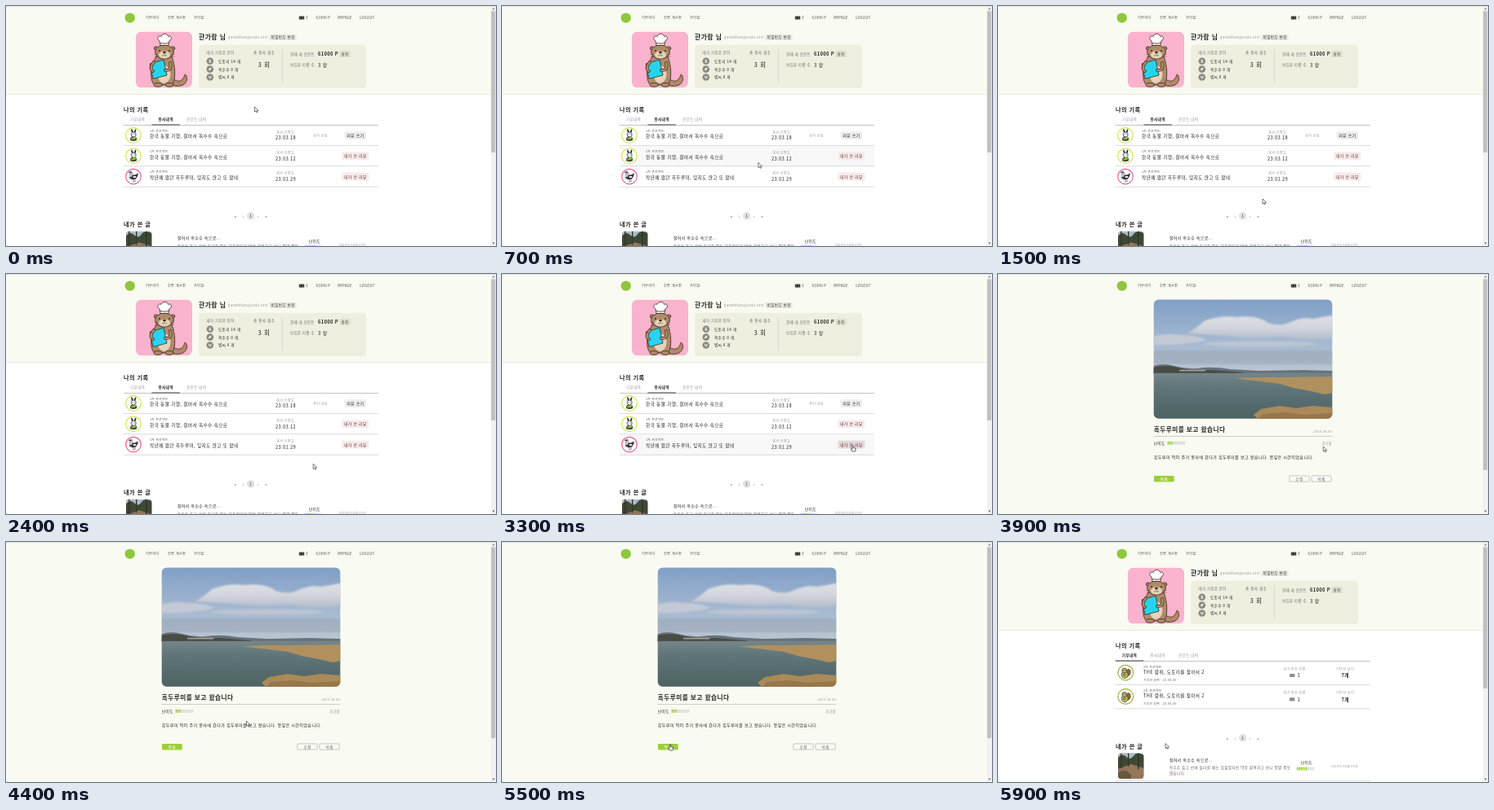
An HTML page that plays this animation: 600 by 295 pixels, repeating every 6 s.

```html
<!DOCTYPE html>
<html lang="ko">
<head>
<meta charset="utf-8">
<title>나의 기록</title>
<style>
  html, body { margin: 0; width: 100%; height: 100%; overflow: hidden; background: #fff; }
  svg { display: block; width: 600px; height: 295px; }
  text { font-family: "Noto Sans CJK KR", "Noto Sans CJK", "Noto Sans", sans-serif; letter-spacing: .065em; white-space: pre; }
</style>
</head>
<body>
<svg id="stage" viewBox="0 0 600 295" xmlns="http://www.w3.org/2000/svg">
  <defs>
    <linearGradient id="sky" x1="0" y1="0" x2="0" y2="1">
      <stop offset="0" stop-color="#7f9fc6"/><stop offset=".55" stop-color="#a3b8d1"/><stop offset="1" stop-color="#bcc6d1"/>
    </linearGradient>
    <linearGradient id="cloud" x1="0" y1="0" x2="0" y2="1">
      <stop offset="0" stop-color="#dfe0e6"/><stop offset=".5" stop-color="#d3d5dd"/><stop offset="1" stop-color="#b3bccb"/>
    </linearGradient>
    <linearGradient id="water" x1="0" y1="0" x2="0" y2="1">
      <stop offset="0" stop-color="#74868a"/><stop offset=".3" stop-color="#607578"/><stop offset="1" stop-color="#4d6262"/>
    </linearGradient>
    <filter id="soft" x="-20%" y="-50%" width="140%" height="200%"><feGaussianBlur stdDeviation="1.3"/></filter>
    <clipPath id="photoClip"><rect x="190.7" y="31.5" width="218.6" height="146.3" rx="6"/></clipPath>
    <clipPath id="thumbClip"><rect x="147" y="259.7" width="31.3" height="31.3" rx="4"/></clipPath>
    <clipPath id="avatarClip"><rect x="159" y="31.5" width="69" height="69" rx="7"/></clipPath>
  </defs>
</svg>
<script>
const LOOP = 6000, STEP = 100, OPEN = 3400, BACK = 5700;
const INK = '#222', MID = '#666', PALE = '#999', GREEN = '#9ccf3b';
const USER = '한가람', MAIL = 'garamhan@sodu.test';
const stage = document.getElementById('stage');

const rect = (x, y, w, h, fill, r = 0, extra = '') =>
  `<rect x="${x}" y="${y}" width="${w}" height="${h}" rx="${r}" fill="${fill}" ${extra}/>`;
const disc = (x, y, r, fill, extra = '') => `<circle cx="${x}" cy="${y}" r="${r}" fill="${fill}" ${extra}/>`;
const oval = (x, y, rx, ry, fill, extra = '') =>
  `<ellipse cx="${x}" cy="${y}" rx="${rx}" ry="${ry}" fill="${fill}" ${extra}/>`;
const shape = (d, fill, extra = '') => `<path d="${d}" fill="${fill}" ${extra}/>`;
const rule = (x, y, w, color = '#c4c4c4', h = .6) => rect(x, y, w, h, color);
const text = (x, y, size, str, fill = INK, weight = 400, anchor = 'start') =>
  `<text x="${x}" y="${y}" font-size="${size * .93}" fill="${fill}" font-weight="${weight}" text-anchor="${anchor}">${str}</text>`;
const mid = (x, y, size, str, fill, weight) => text(x, y, size, str, fill, weight, 'middle');
const move = (x, y, body) => `<g transform="translate(${x} ${y})">${body}</g>`;

const ticket = (x, y, color) => rect(x, y, 6.4, 4.2, color, .6) +
  shape(`M${x + 1.6} ${y + .7}v2.8M${x + 4.8} ${y + .7}v2.8`, 'none', 'stroke="#fff" stroke-width=".4" stroke-dasharray=".6 .5"');

const level = (x, y, on) => Array.from({ length: 10 }, (_, i) =>
  rect(x + i * 2.2, y, 1.5, 4.2, i < on ? GREEN : '#d9d9d4', .4)).join('');

function nav() {
  const links = [[171, '기부하기'], [198, '인증 게시판'], [230, '가이샵'], [367.2, '3'], [379.8, '61000 P'], [406.2, 'MYPAGE'], [433.2, 'LOGOUT']];
  return disc(151.8, 14.6, 6.2, '#8fc73e') + ticket(358.8, 12.4, '#333') +
    links.map(([x, label]) => text(x, 16.1, 4.5, label, '#444')).join('');
}

const scrollbar = end => rect(594, 0, 6, 295, '#f1f1f1') + rect(594, 6.5, 5.2, end - 6.5, '#c1c1c1') +
  shape('M595.4 4.2h3l-1.5-1.9z', '#777') + shape('M595.4 290.8h3l-1.5 1.9z', '#555');

function avatar() {
  const line = 'stroke="#3c2a22" stroke-width=".8" stroke-linejoin="round" stroke-linecap="round"';
  const fur = '#b08a6a', cream = '#e6d3ba';
  const arms = 'M201 70C203 76 200 80 195 79M181 69C177 74 176 78 180 80';
  return '<g clip-path="url(#avatarClip)">' + rect(159, 31.5, 69, 69, '#f9b3cd') +
    shape('M203 88C210 95 217 93 219 84C223 86 223 96 214 98C208 99 203 98 199 95Z', fur, line) +
    shape('M184 62C177 73 175 92 182 97H203C209 90 207 72 203 62Z', fur, line) +
    oval(193.5, 84, 8, 11, cream) +
    oval(186, 97, 5, 2.4, fur, line) + oval(200, 97, 5, 2.4, fur, line) +
    disc(183.5, 52, 2.2, fur, line) + disc(204.5, 52, 2.2, fur, line) +
    oval(194, 56.5, 11.4, 8.6, fur, line) + oval(194, 60, 7, 4.6, cream) +
    disc(188, 55, .9, '#222') + disc(200, 55, .9, '#222') + oval(194, 57, 1.9, 1.2, '#3a2823') +
    shape('M194 58v2M191 60.6q1.5 1.4 3-.6q1.5 2 3 .6M186 60l-4-.6M186 61.6l-4 .8M202 60l4-.6M202 61.6l4 .8', 'none', 'stroke="#3c2a22" stroke-width=".5"') +
    shape('M189 48L188 43C184 41 186 35.5 190 37.3C191.5 33 198 33.5 198.5 37.3C203 36 204 41 199.8 43L199 48Z', '#fff', line) +
    shape('M189 45.6Q194 46.8 199.3 45.6', 'none', line) +
    shape('M176.5 71L193 66L197 85L180.5 89.5Z', '#25d5f0', line) +
    shape(arms, 'none', 'stroke="#3c2a22" stroke-width="3.8" stroke-linecap="round"') +
    shape(arms, 'none', `stroke="${fur}" stroke-width="2.5" stroke-linecap="round"`) + '</g>';
}

const foods = [
  ['도토리 14 개', 'M-1.8-.6Q0-3 1.8-.6ZM-1.5 0H1.5Q1 2 0 2.4Q-1 2-1.5 0Z'],
  ['옥수수 0 개', 'M-1.9 1.8Q-1.6-1.3 1.8-2Q1.9 1-1.9 1.8Z'],
  ['볍씨 0 개', 'M-1.8-1.8Q-.2-1.5-.2 2Q-1.9.4-1.8-1.8ZM1.8-1.8Q.2-1.5.2 2Q1.9.4 1.8-1.8Z']
];

function profile() {
  const food = ([label, icon], i) => {
    const y = 67.7 + i * 9.9;
    return disc(249.8, y, 4.3, '#8b8a80') + move(249.8, y, shape(icon, '#fff')) + text(260, y + 1.9, 5, label);
  };
  return rect(0, 0, 594, 108.5, '#f9faf1') + rule(0, 108.3, 594, '#dfe0d6') + avatar() +
    text(236, 40.6, 8.4, USER + ' 님', INK, 700) + text(272, 40.4, 4.7, MAIL, PALE) +
    rect(322.6, 34.8, 33, 7.3, '#e8e8de', 1.5) + mid(339.1, 40.3, 5, '비밀번호 변경', '#444') +
    rect(236, 47.7, 205, 53.3, '#eeefdf', 3.5) +
    text(245.6, 59.3, 4.8, '내가 기부한 모이', MID) + foods.map(food).join('') +
    mid(316, 59.4, 5, '총 봉사 횟수', MID) + mid(316, 75.4, 8.2, '3 회', INK, 500) +
    rect(337.9, 54, .6, 41, '#c6c7b9') +
    text(348, 60.5, 4.85, '현재 내 포인트', MID) + text(382, 60.9, 6.2, '61000 P', INK, 700) +
    rect(408, 54.8, 14, 7.7, '#dfe0d2', 1.5) + mid(415, 60.5, 5, '충전', '#444') +
    text(348, 74.4, 4.85, '보유한 티켓 수', MID) + text(382, 74.9, 6.5, '3 장', INK, 500);
}

function tabs(active) {
  const names = ['기부내역', '봉사내역', '포인트 내역'], centers = [161, 195.6, 233];
  return text(144, 129.8, 7.7, '나의 기록', INK, 700) + rule(144, 146, 312, '#aaa', .7) +
    names.map((n, i) => mid(centers[i], 141.2, 5, n, i === active ? INK : PALE, i === active ? 700 : 400)).join('') +
    rule(centers[active] - 17.2, 145.5, 34.4, '#444', 1);
}

function posts(dy) {
  const pager = [[281, '«'], [291, '‹'], [299.7, '1'], [309, '›'], [318.5, '»']];
  const thumb = '<g clip-path="url(#thumbClip)">' + rect(147, 259, 32, 33, '#56513f') +
    rect(147, 259, 32, 10, '#a9bccb') +
    shape('M147 265Q152 259 157 264T166 263T179 262V278H147Z', '#3d4934') +
    shape('M147 279L163 273L179 278V292H147Z', '#94765a') +
    shape('M150 259h1.5v19H150zM159 259h1.4v17H159zM171 259h1.6v20H171z', '#35352a') +
    shape('M147 284Q155 277 163 286V292H147Z', '#66593f') + '</g>';
  return move(0, dy, disc(299.7, 240.7, 4.7, '#e0e0e0') +
    pager.map(([x, p]) => mid(x, 242.6, 5.3, p, '#444')).join('') +
    text(144, 253.8, 7.75, '내가 쓴 글', INK, 700) + thumb +
    text(209.7, 269.5, 5.4, '걸어서 옥수수 속으로...', INK, 500) +
    text(209.7, 279.3, 5, '옥수수 들고 산에 올라갈 때는 힘들었지만 막상 참여하고 보니 정말 뿌듯', MID) +
    text(209.7, 286, 5, '했습니다.', MID) +
    mid(378, 273.4, 5.2, '난이도', INK, 500) + level(366, 276.5, 6) +
    text(441, 277.3, 4.2, '2023년 04월 05일', PALE, 400, 'end') + rule(144, 293.2, 312, '#ccc'));
}

const badge = (ring, body) => disc(0, 0, 9.3, '#fff', `stroke="${ring}" stroke-width="1.2"`) + body;
const rabbit = badge('#d8df57',
  oval(-1.5, -5, 1, 3, '#333', 'transform="rotate(-18 -1.5 -5)"') + oval(2, -5, 1, 3, '#333', 'transform="rotate(20 2 -5)"') +
  disc(.2, -1, 3, '#fff', 'stroke="#333" stroke-width=".8"') + disc(-.9, -1.2, .5, '#222') + disc(1.3, -1.2, .5, '#222') +
  shape('M-4 6Q-4 1 0 1.8Q5 1 4 6Q0 8-4 6Z', '#394238') + shape('M-3 5Q-1 1 4 2Q3 6-3 5Z', '#8abf3f'));
const crane = badge('#e85f98',
  shape('M-5 2Q-3-3 2-2L6-4Q5 4-1 4Z', '#333') + shape('M-4 1Q-5-3-3-6L-1.5-5Q-3-3-1 0Z', '#fff', 'stroke="#333" stroke-width=".7"') +
  shape('M-3-6L-6-5L-3-4.6ZM0 4V7.5M2 3V7', '#333', 'stroke="#333" stroke-width=".6"') + oval(1.5, .5, 2, 1.2, '#eee'));
const squirrel = badge('#cfd850',
  disc(0, 0, 9.3, 'none', 'stroke="#555" stroke-width=".8" stroke-dasharray="1.2 1.2"') +
  shape('M2 5Q8 3 6-3Q3-7 1-2Z', '#7b6a3c') + oval(-1, 2.5, 4, 4.3, '#c4b267', 'stroke="#333" stroke-width=".7"') +
  disc(-1.5, -2.5, 3, '#c4b267', 'stroke="#333" stroke-width=".7"') +
  disc(-2.6, -2.8, .5, '#222') + disc(-.3, -2.8, .5, '#222') + oval(-1.5, 2.6, 1.7, 2, '#6f9b3a'));

const ROW_TOP = 146.6, ROW_H = 25.3;
const visits = [
  ['한국 동물 기행, 걸어서 옥수수 속으로', '23.03.18', rabbit, false],
  ['한국 동물 기행, 걸어서 옥수수 속으로', '23.03.12', rabbit, true],
  ['작년에 왔던 흑두루미, 잊지도 않고 또 왔네', '23.01.29', crane, true]
];

function visitRow([title, date, art, done], i) {
  const y = ROW_TOP + i * ROW_H;
  const [bx, bw, fill, label] = done ? [411.3, 33, '#f4ebeb', '내가 쓴 리뷰'] : [414.5, 26.6, '#eee', '리뷰 쓰기'];
  return '<g class="row">' + rect(144, y, 312, ROW_H, '#f8f8f8', 0, 'class="hover" visibility="hidden"') +
    move(156, y + 12.4, art) +
    text(176, y + 8.2, 4.1, '1차 프로젝트', MID) + text(176, y + 15.7, 6.1, title, INK, 500) +
    mid(342, y + 10, 4.4, '봉사 신청일', PALE) + mid(342.5, y + 17.6, 6.1, date, INK, 500) +
    (done ? '' : mid(385, y + 14, 4.4, '봉사 완료', PALE)) +
    rect(bx, y + 7.6, bw, 9.8, fill, 2, 'class="btn"') +
    mid(427.8, y + 14.4, 5.3, label, done ? '#733' : INK, 500) +
    rule(144, y + ROW_H - .6, 312) + '</g>';
}

function giftRow(i) {
  const y = ROW_TOP + i * 29.3;
  return move(156.3, y + 14, squirrel) +
    text(178, y + 7.9, 4.1, '2차 프로젝트', MID) + text(178, y + 15.3, 6.05, 'THE 람쥐, 도토리를 찾아서 2', INK, 500) +
    text(178, y + 24.4, 4.1, '기부한 날짜 : 23.04.06', MID) +
    mid(363, y + 11, 4.4, '내가 받은 티켓', PALE) + ticket(357, y + 15.3, '#888') + text(366.6, y + 19.7, 6.2, '1', INK, 500) +
    mid(425, y + 11, 4.5, '기부한 모이', PALE) + mid(425.3, y + 19.7, 6.2, '7개', INK, 700) +
    rule(144, y + 28.7, 312);
}

const photo = () => '<g clip-path="url(#photoClip)">' + rect(190, 31, 220, 92, 'url(#sky)') +
  '<g filter="url(#soft)">' +
  shape('M232 73Q244 66 252 58Q272 50 292 53Q318 50 330 60Q345 65 356 60Q372 52 386 55L414 50V78Q380 84 350 77Q310 80 280 76Z', 'url(#cloud)') +
  shape('M186 78Q204 72 222 75Q240 74 256 81Q230 88 186 87Z', '#c3cad6') +
  oval(320, 86, 70, 3.5, '#bcc5d2') +
  rect(186, 94, 228, 17, '#8f9cab', 4, 'opacity=".4"') + '</g>' +
  shape('M190 113Q202 109 216 113T244 116Q262 113 284 117L320 119L372 118L410 119V123H190Z', '#66727c') +
  shape('M190 115Q205 111 220 115T262 118L300 121V123H190Z', '#474d45') +
  rect(190, 121.8, 220, 57, 'url(#water)') + rect(222, 117.8, 32, 1.6, '#a9a291') +
  shape('M290 128.5Q310 126 340 127L410 126V146L400 148Q380 143 362 140L345 135L322 132Z', '#b0905f') +
  shape('M318 178L313 173L322 166L345 162L365 165L385 162L410 164V178Z', '#a98a58') +
  shape('M318 178L325 172L350 170L375 173L410 171V178Z', '#96764a') + '</g>';

const LIST = [191, 248, 24.7, 7.4];
const outlineBtn = (x, label) => rect(x, 248, 24.3, 7.2, '#fbfbf6', 1.2, 'stroke="#b0b0ac" stroke-width=".7"') +
  mid(x + 12.15, 253.5, 5.2, label, MID);

const detail = () => rect(0, 0, 600, 295, '#f9faf1') + nav() + photo() +
  text(190.7, 193.6, 8.2, '흑두루미를 보고 왔습니다', INK, 700) +
  text(409, 195.2, 4.3, '2023.04.05', PALE, 400, 'end') + rule(190.7, 199.3, 218.6, '#b9bab3', .7) +
  text(190.7, 210, 5.1, '난이도', INK, 500) + level(207.7, 205.8, 3) +
  text(409, 209.8, 4.6, USER, PALE, 400, 'end') +
  text(190.7, 227, 5.5, '흑두루미 먹이 주기 봉사에 갔다가 흑두루미를 보고 왔습니다. 뜻깊은 시간이었습니다.', INK, 500) +
  rect(...LIST, GREEN, 1) + mid(203.3, 253.6, 5.3, '목록', '#fff') +
  outlineBtn(356.8, '수정') + outlineBtn(383.9, '삭제') + scrollbar(241);

const myPage = (active, rows, dy) => rect(0, 0, 600, 295, '#fff') + profile() + nav() + tabs(active) + rows + posts(dy) + scrollbar(180);

const pages = [
  myPage(1, visits.map(visitRow).join(''), 17.4),
  detail(),
  myPage(0, giftRow(0) + giftRow(1), 0)
];
stage.insertAdjacentHTML('beforeend',
  pages.map(p => `<g class="page">${p}</g>`).join('') + rule(0, 0, 600, '#dcdcd8', .6) +
  '<g id="arrow">' + shape('M0 0V6.2L1.5 4.9L2.5 7L3.5 6.5L2.5 4.5H4.5Z', '#fff', 'stroke="#222" stroke-width=".6" stroke-linejoin="round"') + '</g>' +
  '<g id="hand">' + shape('M-.7.5Q0-.4.7.5V3L3.5 3.7V6L2.8 7.5H-.8L-2.5 4.7Q-2.2 3.7-.7 4.8Z', '#fff', 'stroke="#222" stroke-width=".7" stroke-linejoin="round"') + '</g>');

const pageEls = [...document.querySelectorAll('.page')];
const rowEls = [...document.querySelectorAll('.row')].map(r => {
  const btn = r.querySelector('.btn');
  return { bg: r.querySelector('.hover'), btn, fill: btn.getAttribute('fill') };
});
const arrow = document.getElementById('arrow'), hand = document.getElementById('hand');

// time, x, y of the pointer tip
const path = [
  [0, 304.5, 124], [300, 305, 128], [800, 315, 200], [1300, 324, 237], [1700, 324, 237], [2200, 357, 236],
  [2800, 431, 226], [3000, 429.5, 210.5], [3300, 429.5, 210.5], [3400, 427, 210], [3700, 424, 210],
  [4400, 294.5, 220], [5200, 207, 248.6], [5500, 206, 248.6], [5700, 205, 247.6], [6000, 205, 247.6]
];

function pointer(t) {
  const i = path.findIndex((p, n) => n && t <= p[0]);
  const [a, ax, ay] = path[i - 1], [b, bx, by] = path[i];
  const k = (t - a) / (b - a), e = k * k * (3 - 2 * k);
  return [ax + (bx - ax) * e, ay + (by - ay) * e];
}

const show = (el, on) => el.setAttribute('visibility', on ? 'visible' : 'hidden');
const inside = (x, y, l, t, w, h) => x >= l && x <= l + w && y >= t && y <= t + h;

function draw(now) {
  const t = Math.floor(now % LOOP / STEP) * STEP;
  const page = t < OPEN ? 0 : t < BACK ? 1 : 2;
  const [x, y] = pointer(t);
  let link = page === 1 && inside(x, y, ...LIST);
  pageEls.forEach((el, i) => { el.style.display = i === page ? '' : 'none'; });
  rowEls.forEach((row, i) => {
    const top = ROW_TOP + i * ROW_H;
    const over = page === 0 && inside(x, y, 144, top, 312, ROW_H);
    const press = over && inside(x, y, 411, top + 7.6, 33, 9.8);
    show(row.bg, over);
    row.btn.setAttribute('fill', press ? '#e2d9d9' : row.fill);
    link = link || press;
  });
  show(arrow, !link);
  show(hand, link);
  (link ? hand : arrow).setAttribute('transform', `translate(${x} ${y})`);
}

const start = performance.now();
function tick() {
  draw(performance.now() - start);
  requestAnimationFrame(tick);
}
tick();
</script>
</body>
</html>
```
